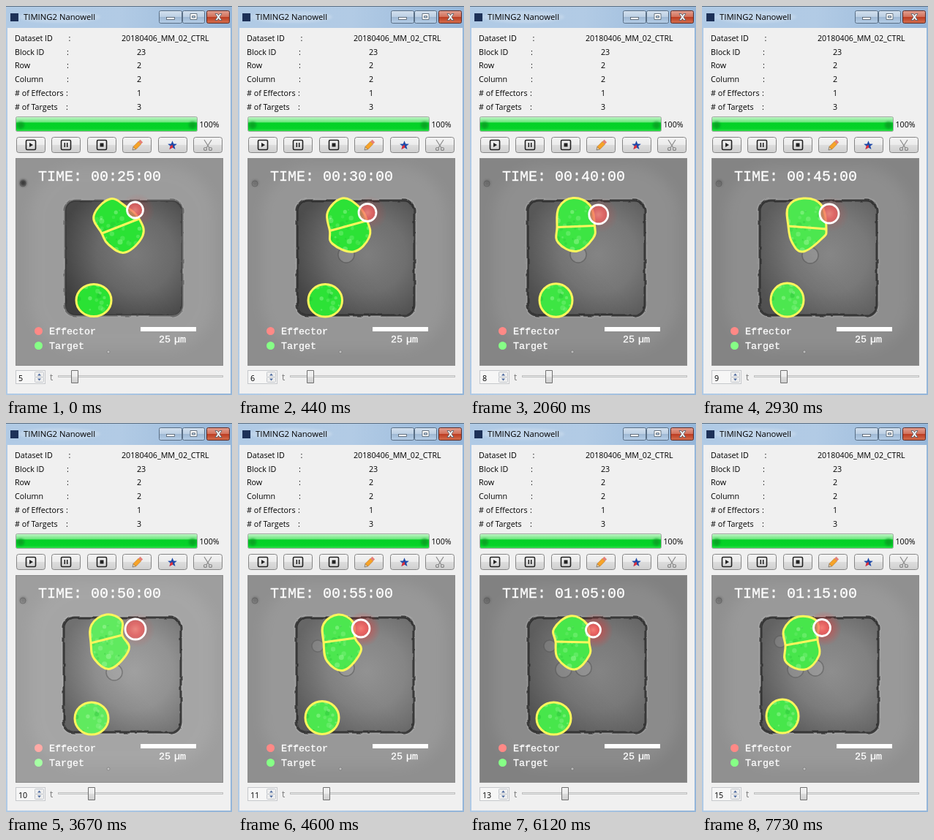
An HTML page for the animation above (8000 ms loop, 309 by 532 pixels).

```html
<!DOCTYPE html>
<html lang="en">
<head>
<meta charset="utf-8">
<title>Nanowell viewer</title>
<style>
  html, body { margin: 0; width: 100%; height: 100%; overflow: hidden; background: #f0f0f0; }
  svg { display: block; width: 100%; height: 100%; }
  .ui { font: 10.7px "Open Sans", sans-serif; fill: #000; }
  .mono { font-family: "Liberation Mono", monospace; fill: #fff; stroke: #fff; stroke-width: .3; }
  .thin { font-size: 13.33px; }
</style>
</head>
<body>
<svg id="stage" viewBox="0 0 309 532">
  <defs>
    <linearGradient id="glass" x2="1" y2=".1">
      <stop stop-color="#b0cae5"/><stop offset=".5" stop-color="#b2cbe5"/><stop offset="1" stop-color="#95b6d9"/>
    </linearGradient>
    <linearGradient id="cap" x2="0" y2="1">
      <stop stop-color="#d3e0ee"/><stop offset=".48" stop-color="#bdd0e4"/><stop offset=".5" stop-color="#9fb8d3"/><stop offset="1" stop-color="#b5cee8"/>
    </linearGradient>
    <linearGradient id="close" x2="0" y2="1">
      <stop stop-color="#e2a091"/><stop offset=".48" stop-color="#d3725c"/><stop offset=".5" stop-color="#bb3a20"/><stop offset="1" stop-color="#d4704f"/>
    </linearGradient>
    <linearGradient id="btn" x2="0" y2="1">
      <stop stop-color="#f3f3f3"/><stop offset=".49" stop-color="#ebebeb"/><stop offset=".5" stop-color="#dddddd"/><stop offset="1" stop-color="#cfcfcf"/>
    </linearGradient>
    <linearGradient id="bar" x2="0" y2="1">
      <stop stop-color="#c5f5cb"/><stop offset=".36" stop-color="#6be77c"/><stop offset=".42" stop-color="#04d027"/><stop offset=".8" stop-color="#05d328"/><stop offset="1" stop-color="#36e050"/>
    </linearGradient>
    <linearGradient id="shade" x1="0" y1="1" x2="1" y2="0">
      <stop stop-color="#000" stop-opacity=".14"/><stop offset=".5" stop-color="#000" stop-opacity="0"/>
    </linearGradient>
    <radialGradient id="floor" cx=".6" cy=".47" r=".66">
      <stop id="centre"/><stop offset=".5" id="middle"/><stop offset="1" id="edge"/>
    </radialGradient>
    <radialGradient id="glow">
      <stop stop-color="#ff2a2a" stop-opacity=".8"/><stop offset=".45" stop-color="#ff2a2a" stop-opacity=".4"/><stop offset="1" stop-color="#ff2a2a" stop-opacity="0"/>
    </radialGradient>
    <radialGradient id="red">
      <stop stop-color="#ff8d84"/><stop offset=".6" stop-color="#f46464"/><stop offset="1" stop-color="#dd6060"/>
    </radialGradient>
    <filter id="soft" x="-30%" y="-30%" width="160%" height="160%"><feGaussianBlur stdDeviation="9"/></filter>
    <filter id="blur2" x="-30%" y="-30%" width="160%" height="160%"><feGaussianBlur stdDeviation="1.6"/></filter>
    <filter id="rough" color-interpolation-filters="sRGB">
      <feTurbulence type="fractalNoise" baseFrequency=".07" numOctaves="2" seed="4"/>
      <feDisplacementMap in="SourceGraphic" scale="4" xChannelSelector="R" yChannelSelector="G"/>
      <feGaussianBlur stdDeviation=".7"/>
    </filter>
    <clipPath id="view"><rect x="14" y="209" width="282" height="282"/></clipPath>
    <clipPath id="pairClip"><path id="pairShape"/></clipPath>
    <clipPath id="loneClip"><ellipse id="loneShape"/></clipPath>
  </defs>

  <!-- window frame -->
  <rect width="309" height="532" fill="url(#glass)"/>
  <path d="M0 .5H309" stroke="#5c6f82"/>
  <ellipse cx="73" cy="15" rx="56" ry="8" fill="#fff" opacity=".2" filter="url(#blur2)"/>
  <rect x="2" y="30" width="305" height="500" fill="#f0f0f0"/>
  <rect x="6" y="10" width="11" height="11" fill="#1d3158"/>
  <text class="ui" x="24" y="18.5" style="font-size:11.3px">TIMING2 Nanowell</text>
  <g stroke="#596e85">
    <rect x="209.500" y="6.500" width="31" height="17" rx="2" fill="url(#cap)"/>
    <rect x="241.500" y="6.500" width="30" height="17" rx="2" fill="url(#cap)"/>
    <rect x="274.500" y="6.500" width="31" height="17" rx="2" fill="url(#close)" stroke="#5b2a26"/>
  </g>
  <g fill="#fff" stroke="#4b5866" stroke-width=".8">
    <rect x="219.500" y="15.500" width="11" height="3"/>
    <path fill-rule="evenodd" d="M252 10.500h9v8h-9zM254.500 13.500h4v2.500h-4z"/>
    <path d="M286 10.500h3l1.500 2.500 1.500-2.500h3l-3 4.500 3 4.500h-3l-1.500-2.500-1.500 2.500h-3l3-4.500z"/>
  </g>
  <g id="info"></g>

  <!-- progress -->
  <rect x="13.500" y="151.500" width="248" height="20" rx="2" fill="url(#bar)" stroke="#a5aaa5"/>
  <g fill="#078a22" opacity=".6" filter="url(#blur2)">
    <circle cx="20" cy="163" r="5"/><circle cx="255" cy="163" r="5"/>
  </g>
  <text class="ui" x="264.500" y="166">100%</text>

  <!-- toolbar -->
  <g id="buttons"></g>
  <g fill="none" stroke="#222" stroke-width="1.600">
    <rect x="27.500" y="183.500" width="13" height="13" rx="1.500"/>
    <rect x="75.500" y="183.500" width="13" height="13" rx="1.500"/>
    <rect x="124.500" y="183.500" width="13" height="13" rx="1.500"/>
  </g>
  <path d="M32 187l5 3-5 3zM79.500 187h1.600v6h-1.600zM82.900 187h1.600v6h-1.600zM128.500 187.500h5v5h-5z" fill="#222"/>
  <g transform="translate(173 197) rotate(-45)">
    <path d="M0 0l4-2.500v5z" fill="#f1d1a1" stroke="#555" stroke-width=".6"/>
    <path d="M4-2.500h10v5h-10z" fill="#f7a428" stroke="#b96b12" stroke-width=".6"/>
    <path d="M14-2.500h3.500v5H14z" fill="#e58078"/>
  </g>
  <g transform="translate(227.500 190.500) scale(.85)">
    <path d="M0-7.500l2 5 5.500.3-4.300 3.500 1.500 5.200-4.700-3-4.700 3 1.500-5.200-4.300-3.500 5.500-.3z" fill="#1d49a8"/>
    <path d="M0-1l1 4.500-5.700 3 1.500-5.200z" fill="#e0303a"/>
  </g>
  <g fill="none" stroke="#8a8a8a" stroke-width="1.200">
    <path d="M271 183l7 11M281 183l-7 11"/><circle cx="272.500" cy="195.500" r="2"/><circle cx="279.500" cy="195.500" r="2"/>
  </g>

  <!-- microscope view -->
  <g clip-path="url(#view)">
    <rect id="base" x="13" y="208" width="284" height="284"/>
    <rect x="32" y="219" width="254" height="252" rx="70" fill="#fff" opacity=".08" filter="url(#soft)"/>
    <circle id="spot" cx="23.500" cy="242" r="4.500" fill="#333" filter="url(#blur2)"/>
    <circle cx="23" cy="243" r="4" fill="none" stroke="#444" opacity=".4"/>
    <circle cx="140" cy="473" r="2" fill="#ddd" stroke="#555" stroke-width=".6" opacity=".6"/>
    <g id="well">
      <rect x="80" y="266" width="160" height="157" rx="14" fill="url(#floor)"/>
      <rect x="80" y="266" width="160" height="157" rx="14" fill="url(#shade)"/>
      <g fill="none" filter="url(#rough)" id="rim">
        <rect x="77.500" y="263.500" width="165" height="162" rx="16" stroke="#ddd" stroke-width="1.500" opacity=".2"/>
        <rect x="80" y="266" width="160" height="157" rx="14" stroke="#2c2c2c" stroke-width="3"/>
      </g>
    </g>
    <g fill="#bbb" fill-opacity=".35" stroke="#444" stroke-opacity=".5" stroke-width="1.500">
      <circle id="ghostA" r="11"/><circle id="ghostB" r="11"/><circle id="ghostC" r="8"/>
    </g>
    <circle id="halo" r="24" fill="url(#glow)"/>
    <g clip-path="url(#pairClip)"><path id="pairFill"/><g id="pairDots"></g></g>
    <g clip-path="url(#loneClip)"><ellipse id="loneFill"/><g id="loneDots"></g></g>
    <g fill="none" stroke="#fdf65c" stroke-width="3" stroke-linejoin="round">
      <path id="pairLine"/><path id="split"/><ellipse id="loneLine"/>
    </g>
    <circle id="eff" fill="url(#red)" fill-opacity=".75" stroke="#fff" stroke-width="2.800"/>
    <text class="mono" x="44" y="239" font-size="20" id="clock"></text>
    <circle cx="44.500" cy="444.500" r="5.500" id="keyRed"/>
    <circle cx="44.500" cy="464.500" r="5.500" id="keyGreen"/>
    <text class="mono thin" x="59" y="449">Effector</text>
    <text class="mono thin" x="59" y="469">Target</text>
    <rect x="184" y="439" width="76" height="6" fill="#fff"/>
    <text class="mono thin" x="209" y="459.500">25</text><text class="mono thin" x="230" y="459.500">µm</text>
  </g>
  <rect x="13.500" y="208.500" width="283" height="283" fill="none" stroke="#8b8b8b"/>

  <!-- frame selector -->
  <rect x="13.500" y="498.500" width="40" height="18" fill="#f6f6f6" stroke="#c6c8cb"/>
  <rect x="39.500" y="500.500" width="12" height="7" rx="1" fill="#eee" stroke="#c3c7cc"/>
  <rect x="39.500" y="507.500" width="12" height="7" rx="1" fill="#eee" stroke="#c3c7cc"/>
  <path d="M43 505.500l2.500-3 2.500 3zM43 509.500l2.500 3 2.500-3z" fill="#4d6a9e"/>
  <text class="ui" x="17" y="512.500" id="num"></text>
  <text class="ui" x="60" y="512" style="fill:#777;font-size:12px">t</text>
  <rect x="71.500" y="505.500" width="225" height="2" fill="#e7eaea" stroke="#c0c0c0"/>
  <path id="knob" d="M-4.500-8.500h9v17h-9z" fill="url(#btn)" stroke="#707070" stroke-linejoin="round"/>
</svg>
<script>
const $ = id => document.getElementById(id);
const NS = 'http://www.w3.org/2000/svg';
const set = (el, attrs) => { for (const k in attrs) el.setAttribute(k, attrs[k]); return el; };
const add = (parent, tag, attrs) => parent.appendChild(set(document.createElementNS(NS, tag), attrs));
const gray = v => `rgb(${v},${v},${v})`;
const mix = (a, b, u) => Array.isArray(a) ? a.map((v, i) => mix(v, b[i], u)) : a + (b - a) * u;

// static rows and buttons
[['Dataset ID', '20180406_MM_02_CTRL', 158], ['Block ID', '23', 179], ['Row', '2', 179],
 ['Column', '2', 179], ['# of Effectors', '1', 179], ['# of Targets', '3', 179]].forEach(([name, value, x], i) => {
  const put = (s, px) => add($('info'), 'text', { class: 'ui', x: px, y: 48 + i * 19 - (i > 1 ? 1 : 0) }).textContent = s;
  put(name, 12); put(':', i ? (i < 4 ? 83 : 82) : 85.5); put(value, x);
});
for (let i = 0; i < 6; i++)
  add($('buttons'), 'rect', { x: 14.5 + Math.round(i * 48.4), y: 179.5, width: 39, height: 21, rx: 3, fill: 'url(#btn)', stroke: '#858585' });

// speckles inside the cells
let seed = 11;
const rnd = () => (seed = seed * 16807 % 2147483647) / 2147483647;
function speckle(group, count, w, h) {
  for (let i = 0; i < count; i++)
    add(group, 'circle', { cx: (rnd() - .5) * w, cy: (rnd() - .5) * h, r: 1 + rnd() * 2.6,
      fill: rnd() < .7 ? '#c4ffbe' : '#18b030', opacity: .1 + rnd() * .25 });
}
speckle($('pairDots'), 60, 62, 76);
speckle($('loneDots'), 22, 46, 44);

// tone: outside, well edge, well centre; pair starts at the left end of the split, fifth point is its right end
const pose = (n, tone, light, pair, lone, eff) => ({ n, tone, light, pair, lone, eff });
const poses = [
  pose(5, [148, 70, 122], .1, [131,311, 120,287, 142,264, 165,275, 182,291, 187,314, 163,337, 140,326], [120, 402.5, 24, 22], [176.5, 279, 11]),
  pose(7, [134, 84, 130], .15, [120,304, 125,277, 143,262, 165,273, 171,296, 172,318, 153,335, 118,324], [118.5, 403, 22.5, 22.5], [177.5, 286, 13]),
  pose(9, [132, 92, 134], .45, [118,301, 118,274, 139,263, 163,272, 170,305, 164,318, 138,336, 123,323], [116.5, 402, 22.5, 23], [174, 284, 13]),
  pose(10, [158, 112, 160], .65, [116,301, 117,276, 137,262, 158,270, 159,290, 168,310, 143,336, 121,323], [117, 404, 23, 22], [177, 282, 14]),
  pose(11, [143, 102, 146], .45, [117,300, 117,275, 137,262, 157,272, 160,294, 168,312, 145,338, 122,326], [115, 403, 23, 22.5], [168, 281, 12]),
  pose(13, [129, 94, 132], .4, [117,299, 115,281, 137,264, 160,275, 163,300, 163,318, 143,337, 120,322], [114.5, 404, 23.5, 22], [168.5, 283, 10]),
  pose(15, [144, 98, 142], .4, [114,304, 112,282, 131,265, 157,271, 158,296, 160,318, 141,337, 115,327], [110, 401, 22, 23], [164, 280, 11.5])
];
function poseAt(n) {
  const i = Math.max(1, poses.findIndex(p => p.n >= n));
  const a = poses[i - 1], b = poses[i], u = (n - a.n) / (b.n - a.n), p = {};
  for (const k in a) p[k] = mix(a[k], b[k], u);
  return p;
}

// closed smooth curve through points
function smooth(c) {
  const m = c.length / 2, at = i => [c[(i + m) % m * 2], c[(i + m) % m * 2 + 1]];
  let d = `M${at(0)}`;
  for (let i = 0; i < m; i++) {
    const [p, q, r, s] = [-1, 0, 1, 2].map(k => at(i + k));
    d += `C${q.map((v, k) => v + (r[k] - p[k]) / 5.2)} ${r.map((v, k) => v - (s[k] - q[k]) / 5.2)} ${r}`;
  }
  return d + 'Z';
}

function draw(n) {
  const { tone, light, pair, lone, eff } = poseAt(n);
  const d = smooth(pair), early = n < 6;
  const green = `rgb(${mix([32, 224, 44], [130, 240, 122], light).map(Math.round)})`;
  set($('base'), { fill: gray(tone[0]) });
  set($('edge'), { 'stop-color': gray(tone[1]) });
  set($('middle'), { 'stop-color': gray(mix(tone[1], tone[2], .7)) });
  set($('centre'), { 'stop-color': gray(tone[2]) });
  set($('rim'), { opacity: early ? .45 : .85 });
  set($('spot'), { opacity: early ? .9 : .3 });
  set($('well'), { transform: `translate(${n < 8 ? 1 : n < 11 ? -1 : n < 14 ? 0 : 1} 0)` });

  const late = n > 11;
  set($('ghostA'), { cx: late ? 155 : 148, cy: n < 9 ? 340 : n < 11 ? 341 : 335, opacity: early ? 0 : .85 });
  set($('ghostB'), { cx: 128, cy: 337, opacity: late ? .7 : 0 });
  set($('ghostC'), { cx: n > 13 ? 107 : 109, cy: n > 13 ? 299 : 305, opacity: n > 10 ? .6 : 0 });

  for (const id of ['pairShape', 'pairFill', 'pairLine']) set($(id), { d });
  set($('pairFill'), { fill: green });
  set($('split'), { d: `M${pair[0]} ${pair[1]}L${pair[8]} ${pair[9]}` });
  const mid = k => (pair[k] + pair[k + 4] + pair[k + 8] + pair[k + 12]) / 4;
  set($('pairDots'), { transform: `translate(${mid(0)} ${mid(1)})` });

  const [cx, cy, rx, ry] = lone;
  for (const id of ['loneShape', 'loneFill', 'loneLine']) set($(id), { cx, cy, rx, ry });
  set($('loneFill'), { fill: green });
  set($('loneDots'), { transform: `translate(${cx} ${cy})` });

  set($('eff'), { cx: eff[0], cy: eff[1], r: eff[2] });
  set($('halo'), { cx: eff[0] + 3, cy: eff[1] + 1, opacity: n > 10 ? .85 : .35 });
  set($('keyRed'), { fill: n === 10 ? '#ffaaa6' : '#ff8986' });
  set($('keyGreen'), { fill: n === 10 ? '#a6ffa4' : '#86ff86' });

  const min = n * 5, two = v => String(v).padStart(2, '0');
  $('clock').textContent = `TIME: ${two(Math.floor(min / 60))}:${two(min % 60)}:00`;
  $('num').textContent = n;
  set($('knob'), { transform: `translate(${94 + Math.round((n - 5) * 4.5)} 507)` });
}

const cuts = [440, 1320, 2060, 2930, 3670, 4600, 5350, 6120, 7010, 7730];
const start = performance.now();
let shown;
function tick() {
  const t = (performance.now() - start) % 8000;
  const n = 5 + cuts.filter(c => c <= t).length;
  if (n !== shown) draw(shown = n);
  requestAnimationFrame(tick);
}
tick();
</script>
</body>
</html>
```
